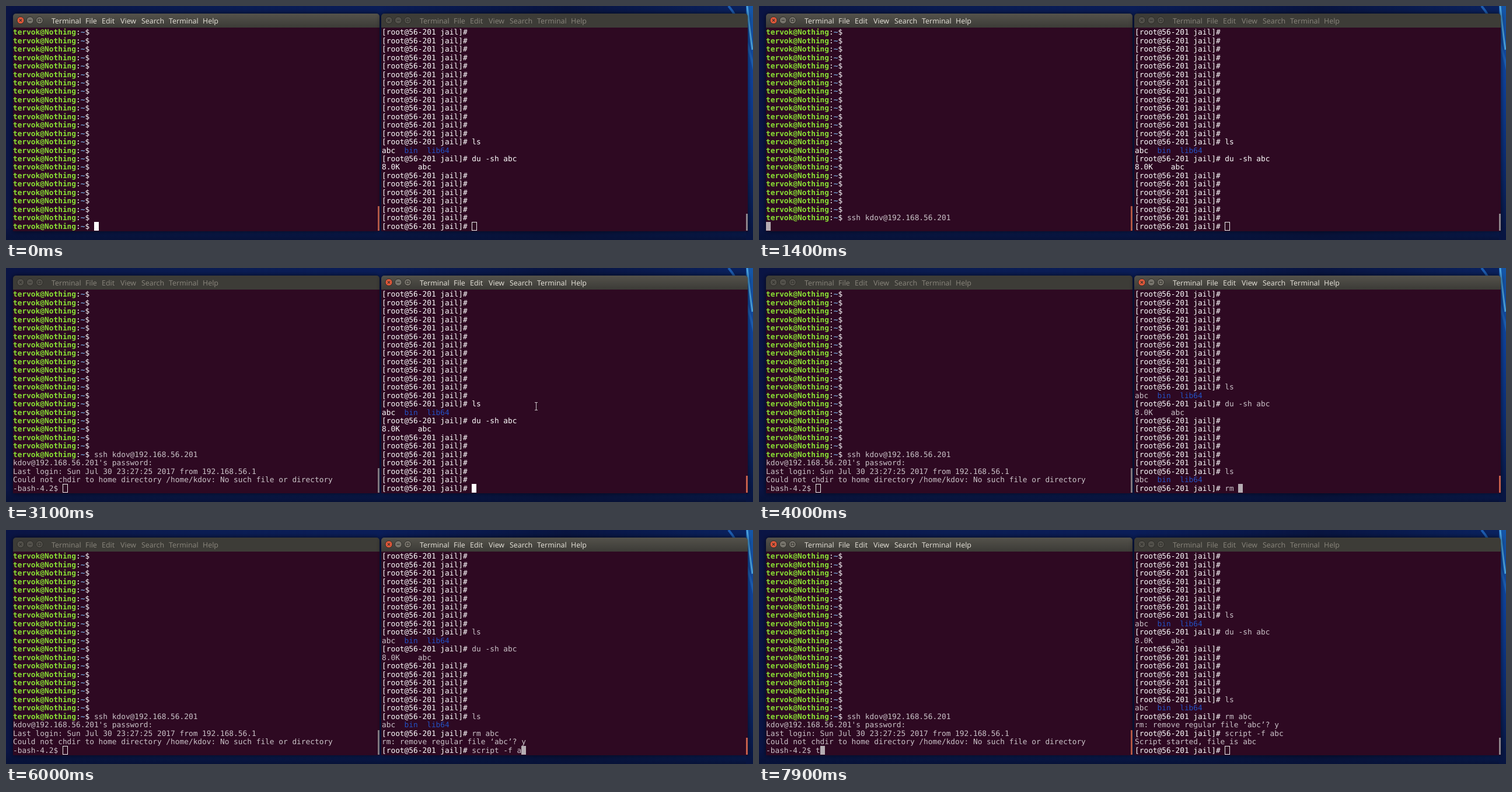
Animation, 1280 px wide and 401 px high, one loop 8 s. Source, as an HTML page with a canvas:

```html
<!DOCTYPE html>
<html lang="en">
<head>
<meta charset="utf-8">
<title>Two terminals</title>
<style>
  html, body { margin: 0; width: 1280px; height: 401px; overflow: hidden; background: #081640; }
  canvas { display: block; }
</style>
</head>
<body>
<canvas width="1280" height="401"></canvas>
<script>
const ctx = document.querySelector('canvas').getContext('2d');
const LOOP = 8000, ROWS = 24, CELL = 7.716, LINE = 14.44, TOP = 37.8;
const MONO = '12.82px "DejaVu Sans Mono", monospace';
const MENU = [['Terminal', 66], ['File', 124], ['Edit', 152], ['View', 184],
              ['Search', 220], ['Terminal', 267], ['Help', 325]];
const USER = 'tervok@Nothing', LOCAL = USER + ':~$ ', ROOT = '[root@56-201 jail]# ';

// Each event is [time, output]; typed text becomes one event per key.
const type = (start, text, step = 100) => [...text].map((c, i) => [start + i * step, c]);

const left = {
  x: 12, barTop: 343,
  events: [
    [0, (LOCAL + '\n').repeat(23) + LOCAL],
    [600, 'ssh kdov@192.168.56.201'],
    [1200, '\n'],
    [1500, "kdov@192.168.56.201's password: "],
    [2300, '\nLast login: Sun Jul 30 23:27:25 2017 from 192.168.56.1\n' +
           'Could not chdir to home directory /home/kdov: No such file or directory\n-bash-4.2$ '],
    [7700, 't'],
  ],
};
const right = {
  x: 643, barTop: 356,
  events: [
    [0, (ROOT + '\n').repeat(13) + ROOT + 'ls\nabc  bin  lib64\n' + ROOT +
        'du -sh abc\n8.0K    abc\n' + (ROOT + '\n').repeat(6) + ROOT],
    ...type(3500, 'ls'),
    [3700, '\nabc  bin  lib64\n' + ROOT],
    ...type(3800, 'rm abc'),
    [4400, '\nrm: remove regular file ‘abc’? '],
    [4550, 'y'],
    [4700, '\n' + ROOT],
    ...type(5000, 'script -f abc'),
    [6500, '\nScript started, file is abc\n' + ROOT],
  ],
};

function gradient(x0, y0, x1, y1, ...colors) {
  const g = ctx.createLinearGradient(x0, y0, x1, y1);
  colors.forEach((c, i) => g.addColorStop(i / (colors.length - 1), c));
  return g;
}

function rect(color, x, y, w, h) {
  ctx.fillStyle = color;
  ctx.fillRect(x, y, w, h);
}

function streak(color, width, x0, y0, cx, cy, x1, y1) {
  ctx.strokeStyle = color;
  ctx.lineWidth = width;
  ctx.beginPath();
  ctx.moveTo(x0, y0);
  ctx.quadraticCurveTo(cx, cy, x1, y1);
  ctx.stroke();
}

function drawWallpaper() {
  rect(gradient(0, 0, 1280, 0, '#0a1444', '#0a1c52', '#0a1d58', '#081440', '#0a2260'), 0, 0, 1280, 401);
  rect(gradient(0, 380, 0, 401, '#05103000', '#071238'), 0, 380, 1280, 21);
  rect(gradient(0, 0, 0, 401, '#1456a8', '#0e3f98', '#0a2a70', '#071440'), 1268, 0, 12, 401);
  streak('#1c5cb0', 4, 1238, 0, 1264, 30, 1282, 110);
  streak('#4aa0dc', 3, 1270, 0, 1274, 40, 1279, 75);
}

// Writes on the character grid of a terminal.
function write(text, x, y, color, bold) {
  ctx.font = (bold ? 'bold ' : '') + MONO;
  ctx.fillStyle = color;
  [...text].forEach((c, i) => c !== ' ' && ctx.fillText(c, x + i * CELL, y));
}

function drawLine(line, x, y, tint) {
  const parts = line.startsWith(LOCAL)
    ? [[USER, '#8ae234', true], [':', '#fff'], ['~', '#729fcf', true], ['$ ', '#fff'], [line.slice(LOCAL.length), tint]]
    : line.startsWith(ROOT)
    ? [[ROOT, '#fff'], [line.slice(ROOT.length), tint]]
    : line.split(/(bin  lib64)/).map(s => [s, s.startsWith('bin') ? '#2351c4' : tint]);
  for (const [text, color, bold] of parts) {
    write(text, x, y, color, bold);
    x += text.length * CELL;
  }
}

function drawButton(x, kind, focused) {
  const y = 24.5;
  ctx.beginPath();
  ctx.arc(x, y, 6, 0, 7);
  ctx.fillStyle = !focused ? '#53514b' : kind ? '#77746c' : '#e2583a';
  ctx.fill();
  ctx.strokeStyle = '#2c2b27';
  ctx.lineWidth = 1;
  ctx.stroke();
  ctx.beginPath();
  if (kind === 0) {
    ctx.moveTo(x - 2.2, y - 2.2); ctx.lineTo(x + 2.2, y + 2.2);
    ctx.moveTo(x + 2.2, y - 2.2); ctx.lineTo(x - 2.2, y + 2.2);
  } else if (kind === 1) {
    ctx.moveTo(x - 2.5, y); ctx.lineTo(x + 2.5, y);
  } else {
    ctx.rect(x - 2.3, y - 2, 4.6, 4);
  }
  ctx.strokeStyle = focused ? '#35332e' : '#33322e';
  ctx.lineWidth = 1.2;
  ctx.stroke();
}

function drawTerminal({ x, barTop, events }, t, focused) {
  ctx.save();
  ctx.shadowColor = '#000a';
  ctx.shadowBlur = 8;
  ctx.fillStyle = focused ? gradient(0, 13, 0, 37, '#54524b', '#3c3b37') : '#3d3c37';
  ctx.beginPath();
  ctx.roundRect(x, 13, 628, 373, [5, 5, 0, 0]);
  ctx.fill();
  ctx.restore();
  rect('#2e0922', x, 37, 628, 349);

  [0, 1, 2].forEach(kind => drawButton(x + 13 + kind * 16.2, kind, focused));
  ctx.font = '12.4px "Noto Sans", "Open Sans", sans-serif';
  ctx.fillStyle = focused ? '#dfdbd2' : '#858178';
  MENU.forEach(([label, dx]) => ctx.fillText(label, x + dx, 30));

  const lines = events.filter(e => e[0] <= t).map(e => e[1]).join('').split('\n');
  const tint = lines.length > ROWS ? '#cbc3c9' : '#fff';
  const textX = x === left.x ? x : x + 1;
  lines.slice(-ROWS).forEach((line, row) => drawLine(line, textX, TOP + 11.6 + row * LINE, tint));

  const cursorX = Math.round(textX + lines.at(-1).length * CELL);
  if (focused) {
    rect(tint === '#fff' ? '#fff' : '#b5adb3', cursorX, 370, 8, 15);
  } else {
    ctx.strokeStyle = '#eee';
    ctx.lineWidth = 1;
    ctx.strokeRect(cursorX + 0.5, 370.5, 8, 14);
  }
  rect(focused ? '#c5604c' : '#8d848b', x + 625, barTop, 3, 385 - barTop);
}

function drawPointer(t) {
  const glide = (from, to, start, end) => {
    const p = Math.min(1, Math.max(0, (t - start) / (end - start)));
    return from + (to - from) * p * p * (3 - 2 * p);
  };
  let x, y;
  if (t >= 2500 && t < 3500) {
    x = glide(515, 908, 2500, 2900);
    y = glide(158, 237, 2500, 2900);
  } else if (t >= 6600 && t < 7700) {
    x = glide(908, 370, 6600, 6950);
    y = glide(237, 236, 6600, 6950);
  } else return;
  x = Math.round(x);
  y = Math.round(y);
  rect('#c8c0c6', x, y - 6, 1, 12);
  rect('#c8c0c6', x - 2, y - 7, 5, 1);
  rect('#c8c0c6', x - 2, y + 6, 5, 1);
}

function draw() {
  const t = performance.now() % LOOP;
  const rightFocused = t >= 3000 && t < 7000;
  ctx.textRendering = 'geometricPrecision';
  drawWallpaper();
  drawTerminal(left, t, !rightFocused);
  drawTerminal(right, t, rightFocused);
  drawPointer(t);
  requestAnimationFrame(draw);
}
draw();
</script>
</body>
</html>
```
